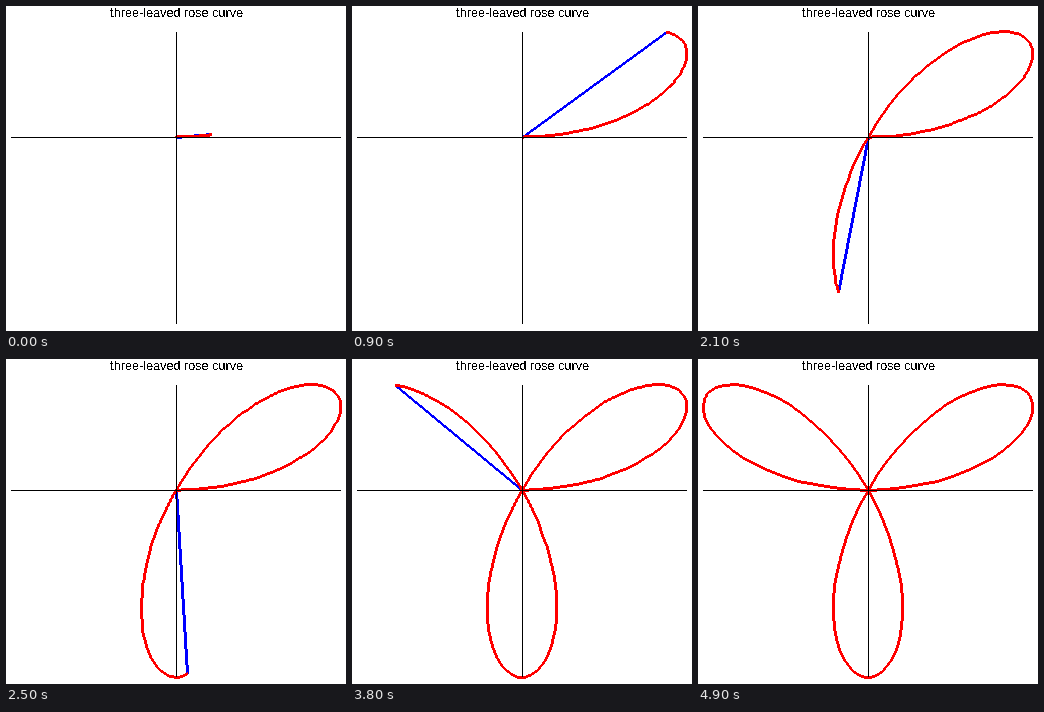
Write a matplotlib script that moves like this. It is 340 by 325 pixels and loops after 5 s.

```python
import numpy as np
import matplotlib.pyplot as plt
from matplotlib.animation import FuncAnimation

WIDTH, HEIGHT, DPI = 340, 325, 100
FRAMES, INTERVAL = 50, 100
CENTER_X, CENTER_Y, RADIUS = 170, 131, 187.3
SAMPLES = 100
WHITE, BLACK, RED, BLUE = (255, 255, 255), (0, 0, 0), (255, 0, 0), (0, 0, 255)

plt.rcParams["text.antialiased"] = False
plt.rcParams["toolbar"] = "None"


def rose(theta):
    """Whole-pixel positions on the three-leaved rose."""
    r = RADIUS * np.sin(3 * theta)
    x = CENTER_X + r * np.cos(theta)
    y = CENTER_Y - r * np.sin(theta)
    return np.floor(np.column_stack([x, y]) + 1e-6).astype(int)


def thick_line(canvas, start, end, color):
    """Pixel line widened to three pixels across its minor axis."""
    dx, dy = np.abs(end - start)
    steps = max(dx, dy) + 1
    x = np.rint(np.linspace(start[0], end[0], steps)).astype(int)
    y = np.rint(np.linspace(start[1], end[1], steps)).astype(int)
    for offset in (-1, 0, 1):
        if dx >= dy:
            canvas[y + offset, x] = color
        else:
            canvas[y, x + offset] = color


def render(frame):
    canvas = np.full((HEIGHT, WIDTH, 3), WHITE, dtype=np.uint8)
    angle = np.pi * (frame + 1) / FRAMES
    points = rose(np.linspace(0, angle, SAMPLES))
    thick_line(canvas, points[0], points[-1], BLUE)
    for start, end in zip(points[:-1], points[1:]):
        thick_line(canvas, start, end, RED)
    canvas[CENTER_Y, 5:335] = BLACK
    canvas[26:318, CENTER_X] = BLACK
    return canvas


fig = plt.figure(figsize=(WIDTH / DPI, HEIGHT / DPI), dpi=DPI, facecolor="white")
ax = fig.add_axes([0, 0, 1, 1])
ax.axis("off")
picture = ax.imshow(render(0), extent=(0, WIDTH, HEIGHT, 0), aspect="auto",
                    interpolation="nearest")
ax.text(104, 11, "three-leaved rose curve", family="Liberation Sans",
        size=12.6 * 72 / DPI, ha="left", va="baseline", color="black")


def update(frame):
    picture.set_data(render(frame))
    return (picture,)


anim = FuncAnimation(fig, update, frames=FRAMES, interval=INTERVAL,
                     repeat=True, repeat_delay=0)
plt.show()
```
